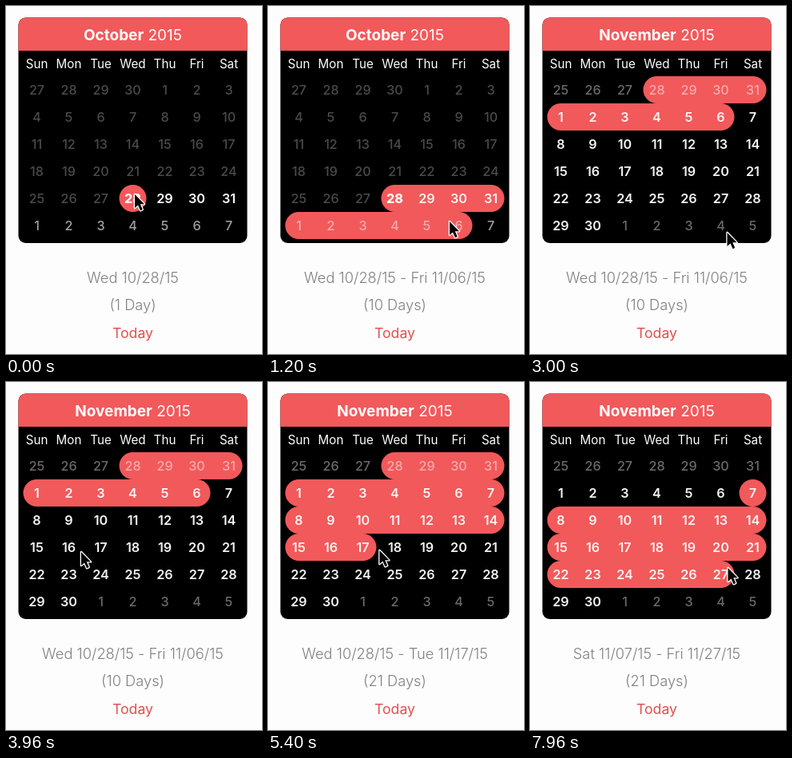
Animation, 320 px wide and 436 px high, one loop 8000 ms. Source, as an HTML page with a canvas:

```html
<!DOCTYPE html>
<html lang="en">
<head>
<meta charset="utf-8">
<title>Date range calendar</title>
<style>
html, body { margin: 0; width: 100%; height: 100%; overflow: hidden; background: #fdfdfd; }
canvas { display: block; width: 320px; height: 436px; }
</style>
</head>
<body>
<canvas id="stage"></canvas>
<script>
const W = 320, H = 436, LOOP = 8000;
const RED = '#f2595b', FONT = 'Inter, "Open Sans", sans-serif';
const MID = 158.5, STEP_X = 40, STEP_Y = 34;
const canvas = document.getElementById('stage');
const ctx = canvas.getContext('2d');
const ratio = window.devicePixelRatio || 1;
canvas.width = W * ratio;
canvas.height = H * ratio;

// Days are counted from 1 October 2015, so 32 is 1 November.
const OCT = { name: 'October', first: -3, from: 1, to: 31 };
const NOV = { name: 'November', first: 25, from: 32, to: 61 };
const WEEK = ['Sun', 'Mon', 'Tue', 'Wed', 'Thu', 'Fri', 'Sat'];
const TODAY = 28;

const DROP = 1300, TAP = 4500, FADE_START = 1900, FADE_TIME = 280;
const HOME = { x: 161, y: 236 };
const moves = [
  { at: 780, until: 1180, x: 227, y: 270 },
  { at: 2300, until: 2800, x: 246.5, y: 284 },
  { at: 3020, until: 3960, x: 94, y: 213 },
  { at: 4000, until: 4300, x: 117, y: 211 },
  { at: 5160, until: 5840, x: 195, y: 211 },
  { at: 5900, until: 6280, x: 210.5, y: 222 },
  { at: 6700, until: 7150, x: 247.5, y: 233 }
];

const colX = c => MID + STEP_X * (c - 3);
const rowY = r => 105 + STEP_Y * r;
const clamp = v => Math.max(0, Math.min(1, v));
const ease = v => v * v * (3 - 2 * v);

function cursorAt(t) {
  let { x, y } = HOME;
  for (const m of moves) {
    const k = ease(clamp((t - m.at) / (m.until - m.at)));
    x += (m.x - x) * k;
    y += (m.y - y) * k;
  }
  return { x, y };
}

// The touch point lies a little inside the arrow.
function dayUnder(month, t) {
  const { x, y } = cursorAt(t);
  const c = Math.round((x - 3 - colX(0)) / STEP_X);
  const r = Math.round((y + 4 - rowY(0)) / STEP_Y);
  return month.first + 7 * r + c;
}

// Drag out a range, tap to extend it, then drag the whole range along.
function selection(t) {
  if (t < TAP) return [TODAY, dayUnder(OCT, Math.min(t, DROP))];
  const end = dayUnder(NOV, t);
  return [TODAY + end - dayUnder(NOV, TAP), end];
}

function text(str, x, y, size, weight, color, align = 'center') {
  ctx.font = `${weight} ${size}px ${FONT}`;
  ctx.textAlign = align;
  ctx.fillStyle = color;
  ctx.fillText(str, x, y);
}

function box(x, y, w, h, radii, color) {
  ctx.fillStyle = color;
  ctx.beginPath();
  ctx.roundRect(x, y, w, h, radii);
  ctx.fill();
}

function title(name) {
  const width = (str, weight) => {
    ctx.font = `${weight} 19px ${FONT}`;
    return ctx.measureText(str).width;
  };
  const a = width(name, 700), b = width(' 2015', 400);
  const x = MID - (a + b) / 2;
  text(name, x, 42.5, 19, 700, '#fff', 'left');
  text(' 2015', x + a, 42.5, 19, 400, '#fff', 'left');
}

function dayColor(month, day, picked) {
  const inside = day >= month.from && day <= month.to;
  if (picked) return inside ? '#fff3f2' : '#f6abac';
  if (month === OCT) return day < TODAY ? '#4a4a4a' : inside ? '#fff' : '#a0a0a0';
  return inside ? '#f4f4f4' : '#6a6a6a';
}

function dayWeight(month, day) {
  if (month === OCT && day === TODAY) return 800;
  return day < month.from || day > month.to || day < TODAY ? 500 : 600;
}

function drawMonth(month, start, end) {
  box(15.5, 14.5, 286, 282.5, 9, '#000');
  box(15.5, 14.5, 286, 41.5, [9, 9, 0, 0], RED);
  title(month.name);
  WEEK.forEach((d, c) => text(d, colX(c), 77.5, 15.2, 400, '#fff'));
  for (let r = 0; r < 6; r++) {
    const first = month.first + 7 * r;
    const a = Math.max(start, first), b = Math.min(end, first + 6);
    if (a <= b) {
      box(colX(a - first) - 17, rowY(r) - 17, STEP_X * (b - a) + 34, 34, 17, RED);
    }
    for (let c = 0; c < 7; c++) {
      const day = first + c;
      const num = new Date(2015, 9, day).getDate();
      const color = dayColor(month, day, day >= start && day <= end);
      text(num, colX(c), rowY(r) + 5.8, 16.2, dayWeight(month, day), color);
    }
  }
}

function label(day) {
  const d = new Date(2015, 9, day);
  const two = n => String(n).padStart(2, '0');
  return `${WEEK[d.getDay()]} ${two(d.getMonth() + 1)}/${two(d.getDate())}/15`;
}

function drawFooter(start, end) {
  const days = end - start + 1;
  const dates = days > 1 ? `${label(start)} - ${label(end)}` : label(start);
  text(dates, MID, 346.5, 18.3, 300, '#808080');
  text(`(${days} Day${days > 1 ? 's' : ''})`, MID, 381, 18.3, 300, '#808080');
  text('Today', MID, 416, 17.7, 400, '#e2504f');
}

function drawCursor({ x, y }) {
  const shape = [[0, 0], [0, 17], [4, 13.4], [7, 20.2], [9.7, 19], [6.8, 12.3], [12, 12.3]];
  ctx.beginPath();
  shape.forEach(([dx, dy]) => ctx.lineTo(x + dx, y + dy));
  ctx.closePath();
  ctx.lineWidth = 2.6;
  ctx.lineJoin = 'round';
  ctx.strokeStyle = '#fff';
  ctx.stroke();
  ctx.fillStyle = '#000';
  ctx.fill();
}

function draw(t) {
  ctx.setTransform(ratio, 0, 0, ratio, 0, 0);
  ctx.fillStyle = '#fdfdfd';
  ctx.fillRect(0, 0, W, H);
  const [start, end] = selection(t);
  const fade = clamp((t - FADE_START) / FADE_TIME);
  if (fade < 1) drawMonth(OCT, start, end);
  if (fade > 0) {
    ctx.globalAlpha = fade;
    drawMonth(NOV, start, end);
    ctx.globalAlpha = 1;
  }
  drawFooter(start, end);
  drawCursor(cursorAt(t));
}

const begin = performance.now();
function tick() {
  draw((performance.now() - begin) % LOOP);
  requestAnimationFrame(tick);
}
tick();
</script>
</body>
</html>
```
